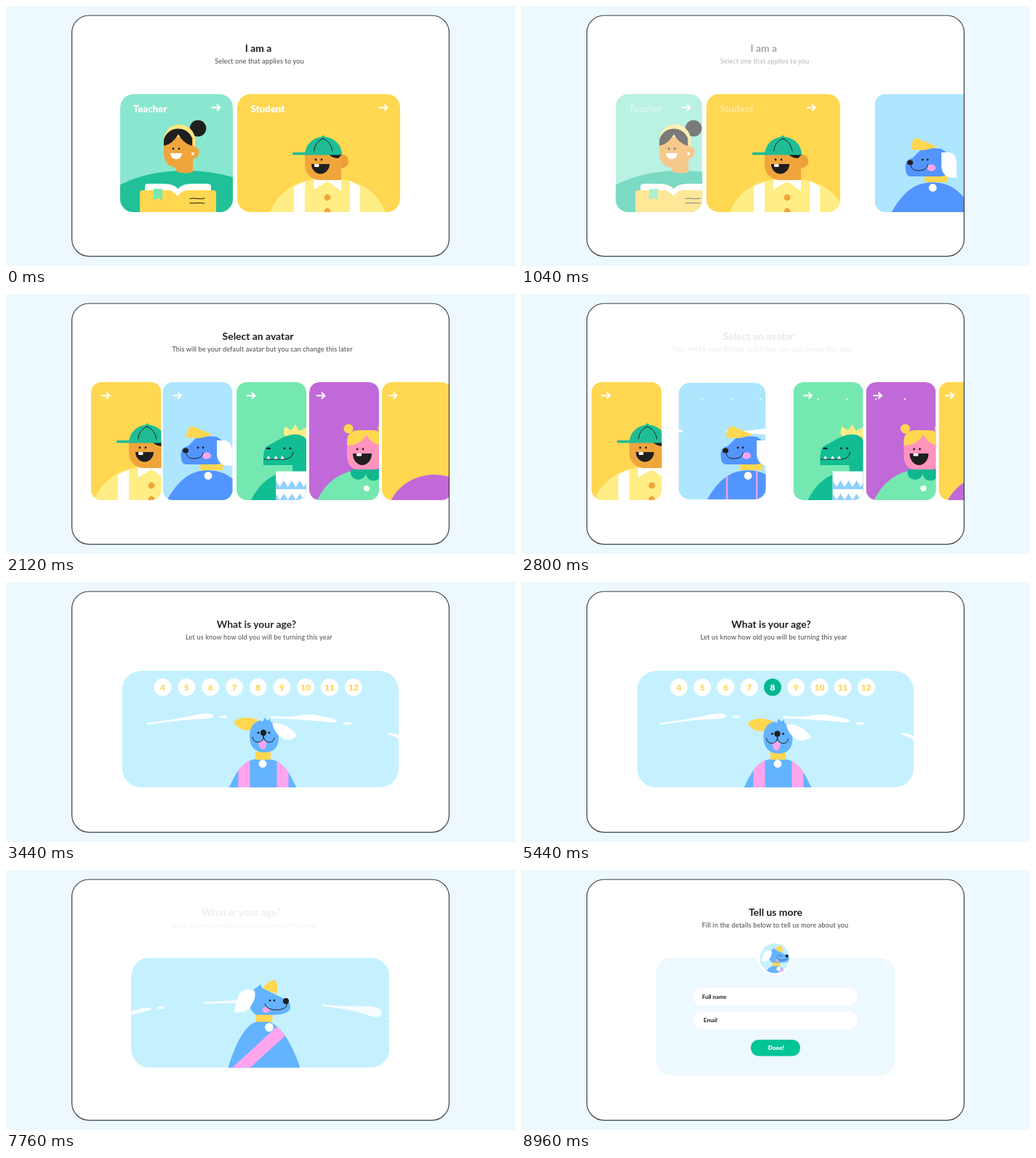
These frames come from a looping animation (700 px wide and 357 px high, 9000 ms). An HTML page:

```html
<!DOCTYPE html>
<html lang="en">
<head>
<meta charset="utf-8">
<title>Onboarding</title>
<style>
html, body { margin: 0; width: 100%; height: 100%; overflow: hidden; background: #eef8ff }
svg { display: block; width: 100%; height: 100%; font-family: Lato, "Open Sans", sans-serif }
</style>
</head>
<body>
<svg id="stage" viewBox="0 0 700 357"></svg>
<script>
const LOOP = 9000, INK = '#1f1f1f', YELLOW = '#ffd751', GREEN = '#20c198', MINT = '#74e8b0',
  PINK = '#ffa5ee', ORANGE = '#f0a53c', PURPLE = '#c169d9';
const stage = document.getElementById('stage');
let t = 0;

const clamp = x => Math.max(0, Math.min(1, x));
const ramp = (a, b) => clamp((t - a) / (b - a));
const mix = (a, b, k) => a + (b - a) * k;
const inOut = u => u < .5 ? 4 * u ** 3 : 1 - 4 * (1 - u) ** 3;
const mixColor = (a, b, k) => `rgb(${a.map((v, i) => Math.round(mix(v, b[i], k)))})`;

const path = (d, fill, more = '') => `<path d="${d}" fill="${fill}" ${more}/>`;
const line = (d, width = 1, color = INK, more = '') =>
  path(d, 'none', `stroke="${color}" stroke-width="${width}" stroke-linecap="round" stroke-linejoin="round" ${more}`);
const oval = (x, y, rx, fill, ry = rx) => `<ellipse cx="${x}" cy="${y}" rx="${rx}" ry="${ry}" fill="${fill}"/>`;
const box = (x, y, w, h, r, fill, more = '') =>
  `<rect x="${x}" y="${y}" width="${w}" height="${h}" rx="${r}" fill="${fill}" ${more}/>`;
const frame = (fill, more) => box(90.6, 13, 518.8, 330.6, 23.5, fill, more);
const group = (body, transform = '', opacity = 1) =>
  opacity > 0 ? `<g transform="${transform}" opacity="${opacity}">${body}</g>` : '';
const move = (body, x, y = 0, opacity = 1) => group(body, `translate(${x} ${y})`, opacity);
const clip = (id, shape, body) => `<clipPath id="${id}">${shape}</clipPath><g clip-path="url(#${id})">${body}</g>`;
const card = (id, x, y, w, h, r, fill, body, more = '') =>
  clip(id, box(x, y, w, h, r, fill), box(x, y, w, h, r, fill, more) + body);
const text = (x, y, s, size, weight, fill, anchor = 'middle', more = '') =>
  `<text x="${x}" y="${y}" font-size="${size}" font-weight="${weight}" fill="${fill}" text-anchor="${anchor}" ${more}>${s}</text>`;
const arrow = (x, opacity = 1, color = '#fff') =>
  move(line('M-5.5 0H5M1.5-3.8L5.5 0L1.5 3.8', 2, color), x, 139.5, opacity);
const eyes = (x, y, gap = 8) => oval(x, y, 1.4, INK) + oval(x + gap, y, 1.4, INK);

function heading(x, title, subX, sub, show, hide) {
  const dx = 10 * (1 - show) - 22 * hide;
  return move(text(x, 62.5, title, 13.9, 700, INK) +
    text(subX, 79, sub, 9, 400, '#444', 'middle', 'letter-spacing=".2"'), dx, 0, show * (1 - hide));
}

const teacher =
  oval(247, 290, 125, GREEN, 64) +
  oval(264, 168, 11.3, INK) +
  path('M217 188V184A21 21 0 0 1 260 184V194H252Z', '#ffe680') +
  path('M217 180H257V228Q245 232 234 227V222Q217 220 217 202Z', ORANGE) +
  path('M217 192V185A20 19 0 0 1 256 182V192Q243 188 237 176Q229 190 217 192Z', INK) +
  oval(256.5, 201, 9, ORANGE) + oval(257, 203, 2, '#fff') + eyes(230, 196) +
  path('M226 202H242A8 8.5 0 0 1 226 202Z', '#fff') +
  box(184, 253, 105, 36, 4, YELLOW) +
  path('M191 253V248Q191 244 195 244H216Q231 244 236.5 251Q242 244 257 244H277Q282 244 282 248V253H248Q240 255 236.5 261Q231 255 225 253Z', '#fff') +
  path('M203 251H215V266L209 264L203 266Z', MINT) +
  line('M253 264.5q5-1 10 0t10-.5M253 270.5q5 .5 10 0t10 .5');

const student =
  path('M363 283Q379 244 424 238H462Q506 244 522 283Z', '#ffed85') +
  path('M396 283V248L411 241V283ZM473 283V240L487 248V283Z', '#fff') +
  box(424, 225, 37, 15, 0, ORANGE) +
  path('M423 238L433 239H452L461 237V254L442 241L423 252Z', '#fff') +
  oval(442, 263, 4.4, ORANGE) + oval(442, 282, 4.4, ORANGE) +
  oval(462, 213, 9.2, '#eba037') +
  path('M411 202H461V239H431Q411 236 411 218Z', ORANGE) +
  path('M444 204H462L457 209Q449 209 444 204Z', INK) +
  path('M411 204.5A25.5 25 0 0 1 462 204.5Z', '#1fbd95') + box(394, 201, 25, 3.5, 1, '#1fbd95') + oval(436, 180, 2.2, '#1fbd95') +
  line('M436 182Q425 186 423.5 199M436 182Q447 186 449 199', 1) +
  eyes(426, 211) + path('M420 217H445A12.5 13.5 0 0 1 420 217Z', INK) + box(424, 217, 6.5, 4, 1, '#fff');

function zigzag(y, h) {
  let d = `M429 ${y}`;
  for (let x = 429; x < 495; x += 11) d += 'l5.5 9l5.5-9';
  return path(`${d}V${y + h}H429Z`, '#8fd0ff');
}
function crest() {
  const pts = ['454,212'];
  for (let i = 0; i <= 14; i++) {
    const a = (-125 + i * 13) * Math.PI / 180, r = i % 2 ? 33 : 25;
    pts.push(`${(454 + r * Math.cos(a)).toFixed(1)},${(212 + r * Math.sin(a)).toFixed(1)}`);
  }
  return `<polygon points="${pts.join(' ')}" fill="#ffed85"/>`;
}
const dino = crest() +
  path('M395 283Q411 250 442 244H482Q514 252 530 283Z', '#12bd93') +
  path('M412 235Q411 213 417 209L437 198Q457 188 469 197Q474 203 474 214V246H452V235Z', '#12bd93') +
  box(429, 243.5, 66, 40, 0, '#fff') + zigzag(256, 12) + zigzag(274, 10) +
  oval(419, 212, 3.3, INK, 1.3) + eyes(441, 212) +
  path('M416 227l3-5 3 5zM426 227l3-5 3 5zM435 227l3-5 3 5z', '#fff') +
  line('M413 227H440Q453 226 453 217');

const girl =
  path('M486 283Q503 248 538 242H572Q606 248 622 283Z', MINT) +
  oval(529, 185, 6.5, YELLOW) + oval(576, 185, 6.5, YELLOW) +
  path('M527 203Q527 188 544 188H561Q578 188 578 203V222Q578 240 560 242H544Q527 240 527 222Z', '#ff94bd') +
  path('M527 208V203Q527 187 544 187H561Q578 187 578 203V208Q561 208 554 193Q545 208 527 208Z', YELLOW) +
  path('M532 241H574V246A9 9 0 0 1 553 246A10.5 9 0 0 1 532 246Z', '#12b78f') +
  oval(554, 267, 4, '#fff') + eyes(541, 213) +
  path('M535 219H561A13 16 0 0 1 535 219Z', INK) + box(540, 219, 7, 3.5, 1, '#fff');

const dogLeftHead =
  box(310, 232, 31, 10, 1, YELLOW) +
  path('M284 226Q281 211 293 209L304 198Q311 194 333 196L340 201V231Q338 234 330 234H291Q284 233 284 226Z', '#5395ff') +
  path('M291 197Q291 185 298 181L327 193Q320 196 308 198Z', YELLOW) +
  path('M333 201H344Q354 203 354 219V236Q333 237 333 219Z', '#fff') +
  oval(290, 215, 4, INK, 3.6) + eyes(307, 211, 7) +
  oval(319, 222, 6, PINK, 4.5) + line('M291 219Q292 227 303 226Q314 225 314 218');

const dogFrontHead =
  path('M347 189Q326 182 313 192Q321 206 337 203Q346 199 347 189Z', YELLOW) +
  path('M335 211Q335 194 350 190L353 192L356 186L359 190L363 188L364 192Q375 197 375 213Q375 234 355 234Q335 233 335 211Z', '#63b3ff') +
  path('M366 194Q386 192 400 211Q391 220 379 214Q369 207 366 194Z', '#fff') +
  path('M347 219Q353 217 358 219V224Q357 230 352.5 230Q348 229 347 219Z', PINK) +
  oval(354, 207, 4.2, INK) + eyes(347, 207, 15) +
  line('M339 213Q340 220 347 220Q354 219 354 211Q355 220 362 220Q368 220 369 214');

const frontClouds =
  path('M194 193.5Q240 188 262 182Q285 178 285 184Q284 188 270 188Q240 189 196 196Q193 196 194 193.5Z', '#fff') +
  box(294, 183.5, 10, 3.2, 1.6, '#fff') +
  path('M364 184Q383 186 400 184Q420 180 432 184Q450 187 455 190Q455 195 440 192Q400 188 364 187Z', '#fff') +
  box(464, 192.5, 11, 3.2, 1.6, '#fff') +
  path('M524 208Q532 205 548 214V219Q534 212 524 208Z', '#fff');

const sideClouds =
  path('M150 196Q170 196 185 190Q200 187 200 192Q190 195 172 199H150Z', '#fff') + box(208, 187.5, 10, 3.2, 1.6, '#fff') +
  path('M273 181Q295 181 330 177V183Q295 182 273 184Q271 183 273 181Z', '#fff') +
  path('M434 184Q465 188 500 187Q518 189 517 197Q514 204 503 201Q480 192 436 187Z', '#fff') +
  path('M522 204Q530 202 545 208V211Z', '#fff');

const sideBodyPath = 'M305 272Q324 211 346 208H362Q386 217 405 272V300H305Z';
const sideDog =
  clip('sideBody', path(sideBodyPath, '#000'), path(sideBodyPath, '#63b3ff') + path('M305 277L376 212L388 224L323 283Z', PINK)) +
  box(344, 198, 22.5, 10.5, 1, YELLOW) + oval(362, 216, 6, '#fff') +
  path('M352 163Q362 151 369 151Q374 152 373 170Z', YELLOW) +
  path('M332 171L345 161L350 157L352 162L383 177Q392 180 391 189Q390 198 370 199H344Q334 194 332 171Z', '#63b3ff') +
  path('M323 167Q333 162 342 166Q345 176 336 188Q330 197 314 195Q316 176 323 167Z', '#fff') +
  oval(357.5, 192, 5, PINK, 4) + oval(385, 180, 4.2, INK) + eyes(363, 179, 6) +
  line('M356 184Q359 193 374 192Q387 191 386.5 183');

function numbers() {
  const r = 12 * (1 - Math.exp(-Math.max(0, t - 2788) / 130)) * (1 - ramp(7100, 7400));
  if (r <= 0) return '';
  const gap = 32.2 + 7.6 * Math.exp(-(t - 2800) / 250), mid = 346 + 23 * Math.exp(-(t - 2800) / 180);
  const pick = ramp(3420, 3700);
  let s = '';
  for (let n = 4; n <= 12; n++) {
    const x = mid + (n - 8) * gap, chosen = n === 8 && pick > 0;
    s += oval(x, 144.5, r, '#fff') + (chosen ? oval(x, 144.5, r * pick, '#00b894') : '') +
      text(x, 144.5 + r * .35, n, r, 900, chosen && pick > .5 ? '#fff' : YELLOW);
  }
  return s;
}

// The chosen dog: from a list card to the wide age card to the round avatar.
function dogCard(p, k1, k2) {
  const key = (a, b, c) => a + (b - a) * k1 + (c - b) * k2;
  const far = 1 - p, m = inOut(ramp(7560, 8320)), turn = ramp(7400, 7540);
  const x0 = 395 * far + key(215.5, 217, 159.5), w0 = 220 * far + key(96, 118.5, 380.5);
  const x = mix(x0, 328.5, m), w = mix(w0, 41, m);
  const y = mix(key(121, 122, 122), 100.5, m), h = mix(key(162, 160, 160), 41, m);
  const r = mix(key(14, 15, 26), 20.5, m);
  const cx = 420 * far + key(278, 312, 353), hw = key(57, 57, 47);
  const body = `M${-hw} 283C${-hw * .72} 256 -26 242 0 242S${hw * .72} 256 ${hw} 283Z`;
  const blue = mixColor([83, 149, 255], [99, 179, 255], k2);
  const sw = key(0, 2, 16);
  const stripe = px => box(px - sw / 2, 240, sw, 45, 0, PINK);
  const sway = (1 - Math.cos(2 * Math.PI * Math.max(0, t - 3440) / 4000)) * .75;
  const front =
    move(frontClouds, -82 * (1 - k2) - Math.max(0, t - 3440) * .0015, 3 * (1 - k2), k1) +
    move(clip('body', path(body, '#000'), path(body, blue) + stripe(key(-29, -29, -25.5)) + stripe(key(12, 12, 27.5))), cx) +
    move(dogLeftHead, cx - 321, 0, 1 - ramp(2860, 3060)) +
    move(box(343, 233, 21, 11, 1, YELLOW) + move(dogFrontHead, -sway, sway), cx - 353, 0, ramp(2860, 3060)) +
    oval(cx, 249.5, 5.4, '#fff');
  const pose = `translate(${mix(350.1, 348.5, m)} ${mix(185, 118, m)}) scale(${mix(1.04, .49, m)}) translate(-350 -180)`;
  const inside =
    group(front, '', 1 - turn) +
    group(sideClouds, pose, turn * clamp(1 - 2 * m)) + group(sideDog, pose, turn) +
    arrow(x + 20, ramp(1350, 1750) * (1 - ramp(2440, 2760)));
  const ring = m > 0 ? box(x - 1.5, y - 1.5, w + 3, h + 3, r + 1.5, '#fff', 'stroke="#fff" stroke-width="3"') : '';
  return ring + card('dog', x, y, w, h, r, mixColor([174, 230, 255], [197, 241, 255], k2), inside);
}

function cards() {
  const p = inOut(ramp(300, 2031)), far = 1 - p;
  const k1 = ramp(2400, 2800) ** 2, k2 = 1 - (1 - ramp(2800, 3360)) ** 3;
  const left = -19.5 * k1 - 110 * k2, right = 56 * k1 + 274 * k2;
  const r = mix(18, 14, p), soft = clamp((p - .8) / .2), solid = clamp((p - .9) / .1);
  let s = '';
  if (k2 < 1) {
    const tx = mix(157, 72, p), sx = mix(318, 117, p) + left, sw = mix(224, 96.5, p);
    s += group(card('teacher', tx, 121, mix(155, 40, p), 162, r, '#8ae7cf',
      move(teacher, tx - 157) + text(tx + 18, 145.5, 'Teacher', 13.2, 900, '#fff', 'start', `opacity="${clamp(1 - 2 * p)}"`) +
      arrow(tx + mix(132, 20, p))), '', clamp(1 - 1.3 * p));
    s += card('student', sx, 121, sw, 162, r, YELLOW,
      move(student, sx + mix(76, 35, p) - 394) +
      text(sx + 18.5, 145.5, 'Student', 13.2, 900, '#fff', 'start', `opacity="${clamp(1 - 2 * p)}"`) +
      arrow(sx + mix(201, 20, p)));
  }
  s += dogCard(p, k1, k2);
  if (k2 < 1) {
    const dx = 317 + 795 * far + right, gx = 417 + 1330 * far + right, fx = 517 + 730 * far + right;
    const ghost = `fill-opacity="${solid}" stroke="#e3a5f2" stroke-width="${2 * (1 - solid)}"`;
    s += card('dino', dx, 121, 96 + 305 * far, 162, r, MINT,
      move(dino, dx - 375 - 600 * far) + arrow(dx + 20 + 540 * far, soft));
    s += card('girl', gx, 121, 96 + 305 * far, 162, r, PURPLE,
      move(girl, gx - 475 - 1070 * far) + arrow(gx + 19, 1 - solid, '#e0a0f0') + arrow(gx + 16, solid), ghost);
    s += card('fifth', fx, 121, 96 + 305 * far, 162, r, YELLOW,
      group(oval(fx + 72, 310, 66, PURPLE, 62), '', solid) + arrow(fx + 15, solid) +
      group(line(`M${fx + .5} 128V276`, 2, '#5fd8a8'), '', 1 - solid), ghost);
  }
  return s + numbers();
}

function form() {
  const a = ramp(8400, 8800);
  return group(box(186, 120.5, 328, 161.5, 20, '#eef8ff') +
    group(box(237, 162, 226, 24, 12, '#fff') + box(237, 194.5, 226, 24, 12, '#fff') +
      text(249, 176.5, 'Full name', 7.9, 700, INK, 'start') + text(251, 208.5, 'Email', 7.9, 700, INK, 'start') +
      box(316, 233, 68, 22.5, 11.25, '#00c596') + text(351, 247, 'Done!', 8.2, 900, '#fff'), '', a), '', ramp(8000, 8360));
}

function draw(now) {
  t = now % LOOP;
  stage.innerHTML =
    frame('#fff') +
    clip('panel', frame('#fff'),
      heading(347, 'I am a', 348.5, 'Select one that applies to you', 1, ramp(800, 1200)) +
      heading(346.5, 'Select an avatar', 352.5, 'This will be your default avatar but you can change this later', ramp(1440, 1840), ramp(2440, 2840)) +
      heading(344, 'What is your age?', 347.5, 'Let us know how old you will be turning this year', ramp(3040, 3460), ramp(7400, 7790)) +
      heading(350, 'Tell us more', 349.5, 'Fill in the details below to tell us more about you', ramp(8400, 8880), 0) +
      form() + cards()) +
    frame('none', 'stroke="#3a3f44" stroke-width="1.2"');
}

const start = performance.now();
function tick() {
  draw(performance.now() - start);
  requestAnimationFrame(tick);
}
tick();
</script>
</body>
</html>
```
